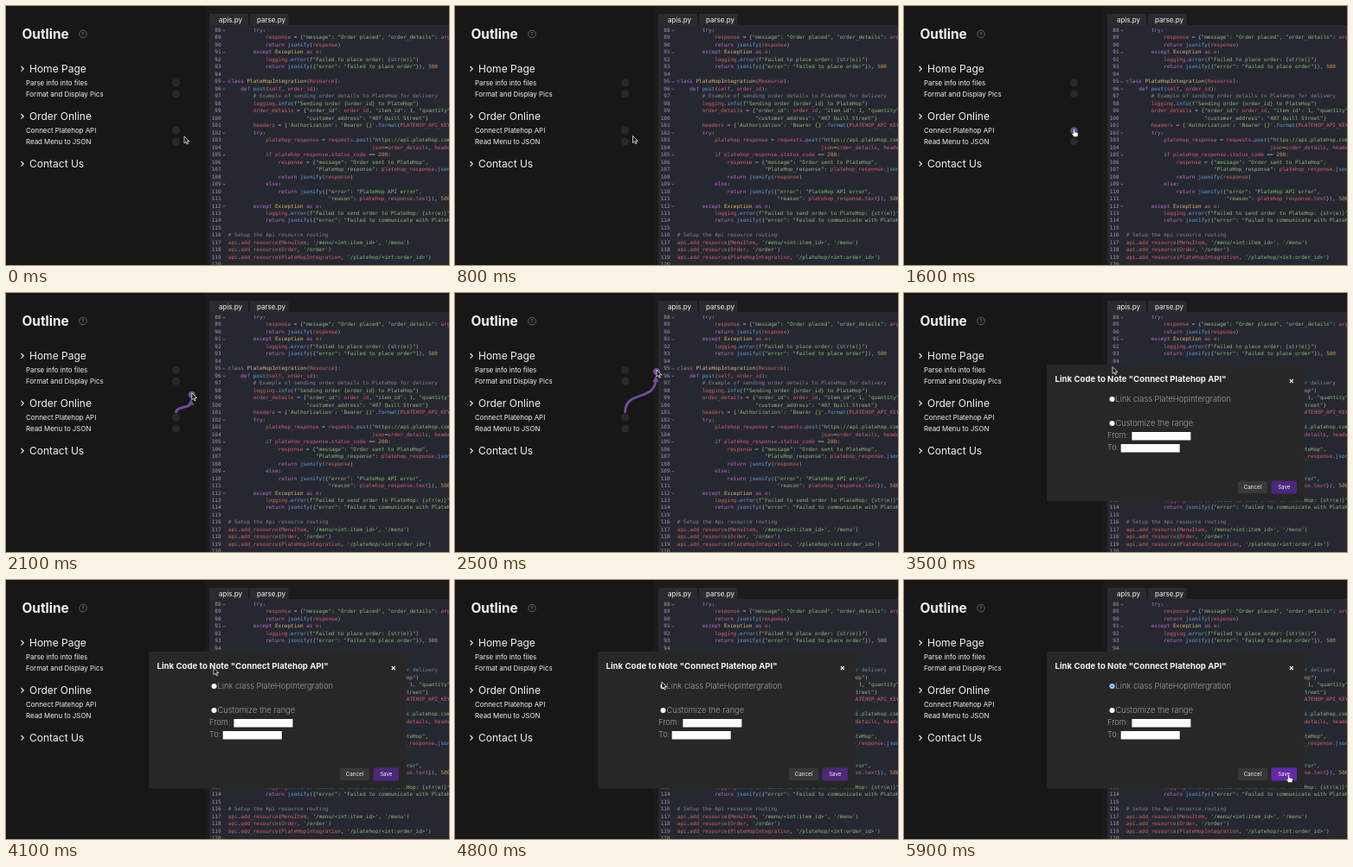
Animation, 512 px wide and 300 px high, one loop 6000 ms. Source, as an HTML page:

```html
<!DOCTYPE html>
<html lang="en">
<head>
<meta charset="utf-8">
<title>Link code to note</title>
<style>
html, body { margin: 0; width: 100%; height: 100%; overflow: hidden; background: #171717; }
svg { display: block; width: 100vw; height: 100vh; font-family: Inter, sans-serif; fill: #f2f2f2; }
text { white-space: pre; }
.title { font-size: 15.4px; font-weight: 700; }
.head { font-size: 12px; }
.item { font-size: 7.9px; }
.tab { font-size: 8px; }
.code { font: 6px "DejaVu Sans Mono", monospace; fill: #abb2bf; }
.num { fill: #a098b0; text-anchor: end; }
.comment { fill: #7f848e; }
.string { fill: #91b877; }
.keyword { fill: #b96fd0; }
.number { fill: #d19a66; }
.call { fill: #62a3dc; }
.type { fill: #dcba78; }
.name { fill: #d4606c; }
.line { fill: none; stroke: #f2f2f2; stroke-width: 1.1; }
.label { font-size: 9.3px; font-weight: 300; fill: #a0a0a0; }
.button { font-size: 6.2px; text-anchor: middle; }
.cursor { fill: #111; stroke: #eee; stroke-width: .8; stroke-linejoin: round; }
</style>
</head>
<body>
<svg id="stage" viewBox="0 0 512 300" preserveAspectRatio="none">
  <rect width="512" height="300" fill="#171717"/>
  <text class="title" x="18.5" y="38">Outline</text>
  <circle cx="89" cy="32.5" r="4.3" fill="none" stroke="#777" stroke-width=".8"/>
  <text x="89" y="35" font-size="6.5" text-anchor="middle" style="fill:#888">?</text>
  <g id="outline"></g>
  <rect x="230" width="282" height="300" fill="#1b1b1c"/>
  <rect x="235" y="22" width="277" height="278" fill="#262831"/>
  <path d="M235 9h45v13h-45zM282 9h44.500v13h-44.500z" fill="#2b2b2d"/>
  <text class="tab" x="246" y="18.700">apis.py</text>
  <text class="tab" x="290" y="18.700">parse.py</text>
  <g id="editor"></g>
  <g id="link">
    <clipPath id="edge"><rect width="235.500" height="300"/></clipPath>
    <g clip-path="url(#edge)">
      <path id="curve" fill="none" stroke="#6d4f97" stroke-width="2.800"/>
      <path id="tip" d="M0-3l3.700 7h-7.400z" fill="#6d4f97"/>
    </g>
    <circle id="halo" r="4" fill="#6d4f97"/>
  </g>
  <g id="dialog">
    <rect x="165" y="83" width="297.500" height="158.500" fill="#272727"/>
    <text x="174.500" y="102.500" font-size="9.650" font-weight="700">Link Code to Note "Connect Platehop API"</text>
    <path class="line" d="M445.800 100l4 4m0-4l-4 4"/>
    <circle cx="240.500" cy="123" r="3" fill="#fff"/>
    <g id="dot">
      <circle cx="240.500" cy="123" r="2.700" fill="#fff" stroke="#3976d2" stroke-width=".8"/>
      <circle cx="240.500" cy="123" r="1.400" fill="#3976d2"/>
    </g>
    <circle cx="240.500" cy="151" r="3" fill="#fff"/>
    <text class="label" x="244.500" y="126.200">Link class PlateHopIntergration</text>
    <text class="label" x="244.500" y="154.200">Customize the range</text>
    <text class="label" x="235" y="168.200">From:</text>
    <text class="label" x="235" y="182">To:</text>
    <path d="M263.400 161h68v9.500h-68zM250.700 175h68v9.500h-68z" fill="#fff"/>
    <rect x="386" y="218" width="34" height="14" rx="1.500" fill="#383838"/>
    <text class="button" x="403" y="227.200">Cancel</text>
    <rect id="save" x="424.500" y="217.500" width="29.500" height="15" rx="1.500"/>
    <text class="button" x="439.300" y="227.200">Save</text>
  </g>
  <path id="arrow" class="cursor" d="M0 0v8l1.900-1.700 1.300 2.800 1.300-.6-1.300-2.700h2.600z"/>
  <path id="hand" class="cursor" style="fill:#fff;stroke:#222;stroke-width:.5" d="M-.9.500q.9-1 1.800 0v3l3.200.8q.8.300.6 1.300l-.6 3.400h-4.300l-2.500-3.500q.2-1.200 1.800 0z"/>
</svg>
<script>
const $ = id => document.getElementById(id);

function add(parent, tag, attrs, content = "") {
  const node = document.createElementNS("http://www.w3.org/2000/svg", tag);
  for (const key in attrs) node.setAttribute(key, attrs[key]);
  node.textContent = content;
  parent.append(node);
  return node;
}

const sections = [
  ["Home Page", "Parse info into files", "Format and Display Pics"],
  ["Order Online", "Connect Platehop API", "Read Menu to JSON"],
  ["Contact Us"]
];
sections.forEach(([heading, ...items], i) => {
  const y = 77 + i * 55;
  add($("outline"), "path", { class: "line", d: `M17.500 ${y - 7}l2.800 2.800-2.800 2.800` });
  add($("outline"), "text", { class: "head", x: 27, y }, heading);
  items.forEach((item, j) => {
    const row = y + 14.7 + j * 13;
    add($("outline"), "text", { class: "item", x: 23, y: row }, item);
    add($("outline"), "circle", { cx: 196.5, cy: row - 2.7, r: 4.5, fill: "#292929" });
  });
});

const code = String.raw`        try:
            response = {"message": "Order placed", "order_details": args}
            return jsonify(response)
        except Exception as e:
            logging.error(f"Failed to place order: {str(e)}")
            return jsonify({"error": "Failed to place order"}), 500

class PlateHopIntegration(Resource):
    def post(self, order_id):
        # Example of sending order details to PlateHop for delivery
        logging.info(f"Sending order {order_id} to PlateHop")
        order_details = {"order_id": order_id, "item_id": 1, "quantity": 1,
                         "customer_address": "407 Quill Street"}
        headers = {'Authorization': 'Bearer {}'.format(PLATEHOP_API_KEY)}
        try:
            platehop_response = requests.post("https://api.platehop.com",
                                              json=order_details, headers=headers)
            if platehop_response.status_code == 200:
                response = {"message": "Order sent to PlateHop",
                            "PlateHop_response": platehop_response.json()}
                return jsonify(response)
            else:
                return jsonify({"error": "PlateHop API error",
                                "reason": platehop_response.text}), 500
        except Exception as e:
            logging.error(f"Failed to send order to PlateHop: {str(e)}")
            return jsonify({"error": "Failed to communicate with PlateHop"}), 500

# Setup the Api resource routing
api.add_resource(MenuItem, '/menu/<int:item_id>', '/menu')
api.add_resource(Order, '/order')
api.add_resource(PlateHopIntegration, '/platehop/<int:order_id>')
`;

const token = /(?<comment>#.*)|(?<string>f?"[^"]*"|'[^']*')|(?<keyword>\b(?:try|return|except|as|class|def|if|else)\b)|(?<number>\b\d+\b)|(?<type>(?<=class )\w+|\bException\b)|(?<call>\b[a-z]+(?=\())|(?<name>\w+)|\W/g;

code.split("\n").forEach((line, i) => {
  const y = 30 + i * 8.48, indent = line.search(/\S|$/);
  add($("editor"), "text", { class: "code num", x: 248.5, y }, 88 + i);
  if (line.endsWith(":"))
    add($("editor"), "path", { d: `M250.500 ${y - 2.2}l1.300 1.300 1.300-1.300`, fill: "none", stroke: "#999", "stroke-width": .7 });
  const text = add($("editor"), "text", { class: "code", x: 256.8 + indent * 3.612, y });
  for (const match of line.trim().matchAll(token)) {
    const kind = Object.keys(match.groups).find(key => match.groups[key]);
    add(text, "tspan", kind ? { class: kind } : {}, match[0]);
  }
});

// Pointer stops: time, x, y
const stops = [
  [0, 206, 151], [700, 206, 151], [1400, 196.5, 142.5], [1700, 196.5, 142.5],
  [2500, 233, 89], [2900, 233, 89], [3300, 241, 85.5], [3700, 241, 85.5],
  [4500, 239, 118], [5100, 239, 118], [5700, 444.5, 225.5], [6000, 444.5, 225.5]
];

function pointer(t) {
  const i = stops.findIndex(stop => stop[0] > t);
  const [t0, x0, y0] = stops[i - 1], [t1, x1, y1] = stops[i];
  const p = (t - t0) / (t1 - t0), e = p * p * (3 - 2 * p);
  return [x0 + (x1 - x0) * e, y0 + (y1 - y0) * e];
}

const show = (id, on) => $(id).style.display = on ? "" : "none";

function draw(now) {
  const t = Math.floor(now % 6000 / 100) * 100;
  const [x, y] = pointer(t);
  const place = `translate(${x} ${y})`;
  const dragging = t >= 1700 && t < 3500;
  const hand = t >= 1400 && t < 1800 || t >= 5700;

  show("link", t >= 1400 && t < 3500);
  show("curve", dragging);
  show("tip", t >= 1900);
  const endX = x - 1, endY = Math.min(y + 10, 139), mid = (139 + endY) / 2;
  const bend = (139 - endY) / 5;
  $("curve").setAttribute("d", `M196.500 139C196.500 ${mid - bend} ${endX} ${mid + bend} ${endX} ${endY}`);
  $("tip").setAttribute("transform", `translate(${endX} ${endY})`);
  $("halo").setAttribute("transform", dragging ? `translate(${x} ${y + 2})` : "translate(196.5 144.5)");

  show("dialog", t >= 3500);
  show("dot", t >= 4900);
  $("save").setAttribute("fill", t >= 5700 ? "#6429ad" : "#4b2879");
  show("hand", hand);
  show("arrow", !hand);
  $("hand").setAttribute("transform", place);
  $("arrow").setAttribute("transform", place);
}

const start = performance.now();
function tick() {
  draw(performance.now() - start);
  requestAnimationFrame(tick);
}
tick();
</script>
</body>
</html>
```
